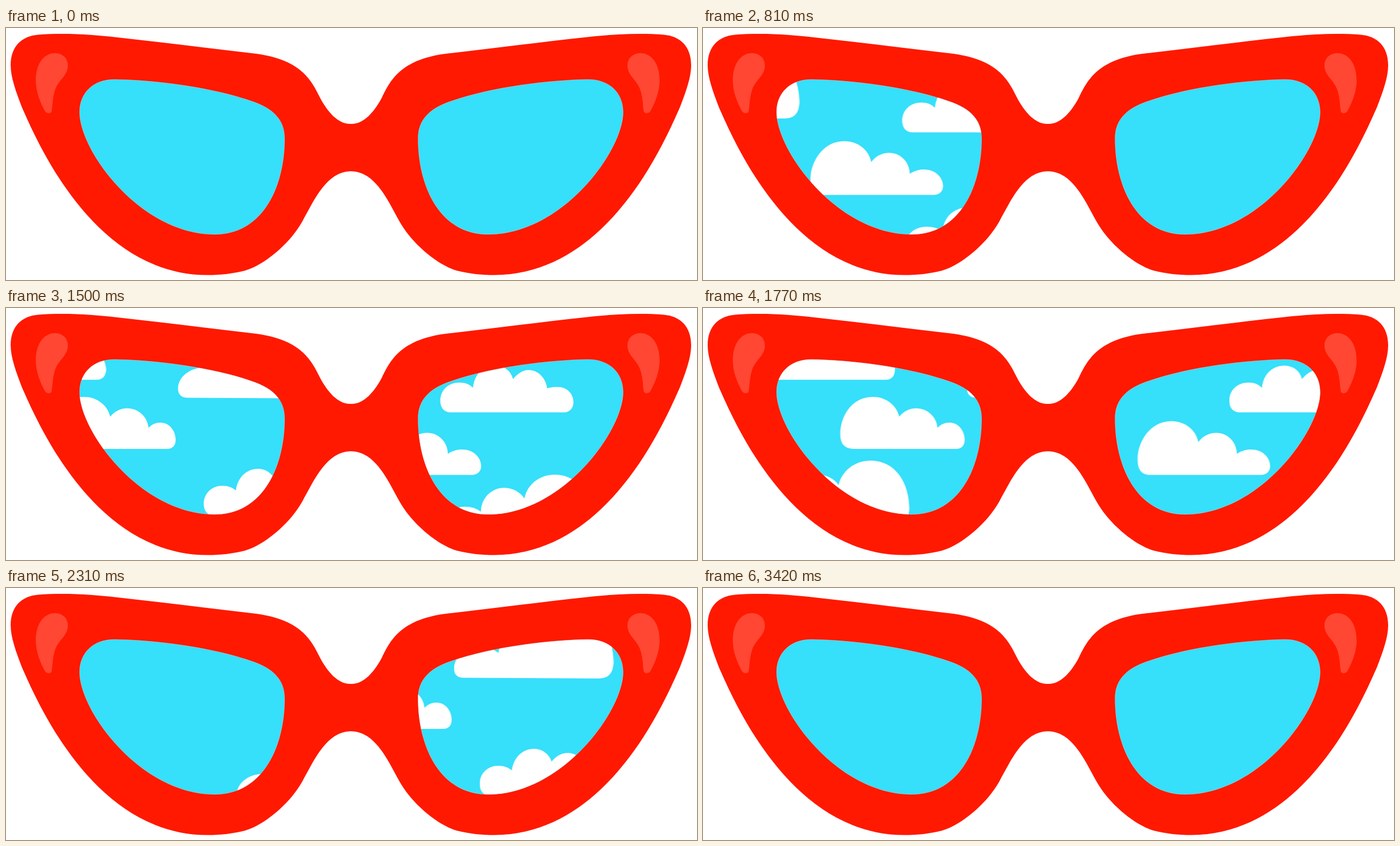
Write an HTML page without scripts that moves like this. It is 1183 px wide and 431 px high and loops after 3600 ms.

```html
<!DOCTYPE html>
<html lang="en">
<head>
<meta charset="utf-8">
<title>Cloud glasses</title>
<style>
  html, body { margin: 0; width: 100%; height: 100%; overflow: hidden; background: #fff; }
  svg { display: block; width: 100vw; height: 100vh; }
  .rim { fill: #ff1900; }
  .shine { fill: #ff4733; }
  .glass { fill: #36dffa; stroke: #fff; stroke-width: .7; stroke-opacity: .4; }
  .sky { fill: #fff; animation: drift 3.6s steps(120) infinite; }
  @keyframes drift { to { transform: translateX(2100px); } }
</style>
</head>
<body>
<svg viewBox="0 0 1183 431">
  <defs>
    <path id="rim" d="M592,164 H589 C568,164 550,143 537,118 C524,93 508,52 420,43
      C340,34 265,24 190,16 C150,11.5 103,8 55,11.5 C27,14 8,31 8,64
      C8,84 17,109 27,135 C54,196 151,422.5 345,422.5 C368,422.5 389,420 409,415
      C443,405 483,370 503,338 C524,304 545,245 591,245 H592 Z"/>
    <path id="lens" d="M186,88 C250,89 348,100 420,125 C460,138 477,159 477,189
      C477,268 442,353 357,353 C230,353 126,210 126,144 C126,111 149,88 186,88 Z"/>
    <path id="shine" d="M84,43 C97,43 106,52 106,64 C106,82 90,88 84,106
      C79,122 80,134 78,143 C77,147 69,147 66,141 C58,126 51,108 51,90 C51,62 64,43 84,43 Z"/>

    <!-- clouds rest on y = 0 with their left end at x = 0 -->
    <path id="long" d="M22,0 C6,0 0,-10 0,-27 C0,-55 20,-92 58,-92 C80,-92 100,-78 104,-56
      C111,-66 122,-72 135,-72 C154,-72 170,-56 170,-36 C177,-41 185,-43.5 194,-43.5
      C214,-43.5 227,-30 227,-15 C227,-6 220,0 211,0 Z"/>
    <path id="short" d="M25,0 C8,0 0,-8 0,-25 C0,-55 19,-89 56,-89 C77,-89 96,-76 101,-55
      C108,-64 118,-69.5 130,-69.5 C149,-69.5 165,-55 166.5,-36 C172,-42 179,-45 187,-45
      C203,-45 213,-30 213,-16 C213,-6 208,0 198,0 Z"/>
    <path id="puffy" d="M18,0 C6,0 0,-8 0,-20 C0,-38 14,-51 33,-51 C43,-51 50,-48 56,-42
      C58,-65 74,-80 94,-80 C109,-80 121,-71 124.5,-57 C133,-67 142,-72.5 151,-72.5
      C168,-72.5 181,-58 183,-41 C189,-43 195,-43.5 201,-43.5
      C217,-43.5 228,-32 228,-17 C228,-7 221,0 212,0 Z"/>
    <path id="wide" d="M18,0 C6,0 0,-8 0,-20 C0,-38 14,-51 32,-51 C42,-51 49,-48 55,-43
      C58,-65 73,-80 93,-80 C107,-80 119,-71 123,-58 C131,-68 141,-73 151,-73
      C167,-73 180,-59 181.5,-41 C189,-45 197,-47 207,-47
      C226,-47 239,-33 239,-17 C239,-7 232,0 222,0 Z"/>
    <path id="rising" d="M16,-.5 C6,-.5 0,-6 0,-16 C0,-36 20,-52 45,-52 C58,-52 69,-49 76,-43
      C80,-66 94,-85 115,-85 C132,-85 145,-78 152,-67 C158,-92 180,-109 207,-109
      C250,-109 273,-70 273,-28 C273,-8 264,.7 248,.7 Z"/>

    <clipPath id="view">
      <use href="#lens"/>
      <use href="#lens" transform="matrix(-1 0 0 1 1182.5 0)"/>
    </clipPath>
  </defs>

  <g class="rim">
    <use href="#rim"/>
    <use href="#rim" transform="matrix(-1 0 0 1 1181 0)"/>
  </g>
  <g class="shine">
    <use href="#shine"/>
    <use href="#shine" transform="matrix(-1 0 0 1 1170 0)"/>
  </g>
  <g class="glass">
    <use href="#lens"/>
    <use href="#lens" transform="matrix(-1 0 0 1 1182.5 0)"/>
  </g>

  <g clip-path="url(#view)">
    <g class="sky">
      <use href="#puffy" x="-131.5" y="178.5"/>
      <use href="#long" transform="translate(130 389) scale(-1.13 1.13)"/>
      <use href="#long" x="-288.5" y="285.5"/>
      <use href="#wide" x="-536.5" y="355"/>
      <use href="#rising" x="-580.5" y="154"/>
      <use href="#short" x="-797.5" y="241"/>
      <use href="#short" transform="translate(-944.5 123) scale(1.13)"/>
      <use href="#rising" x="-952.5" y="370"/>
    </g>
  </g>
</svg>
</body>
</html>
```
